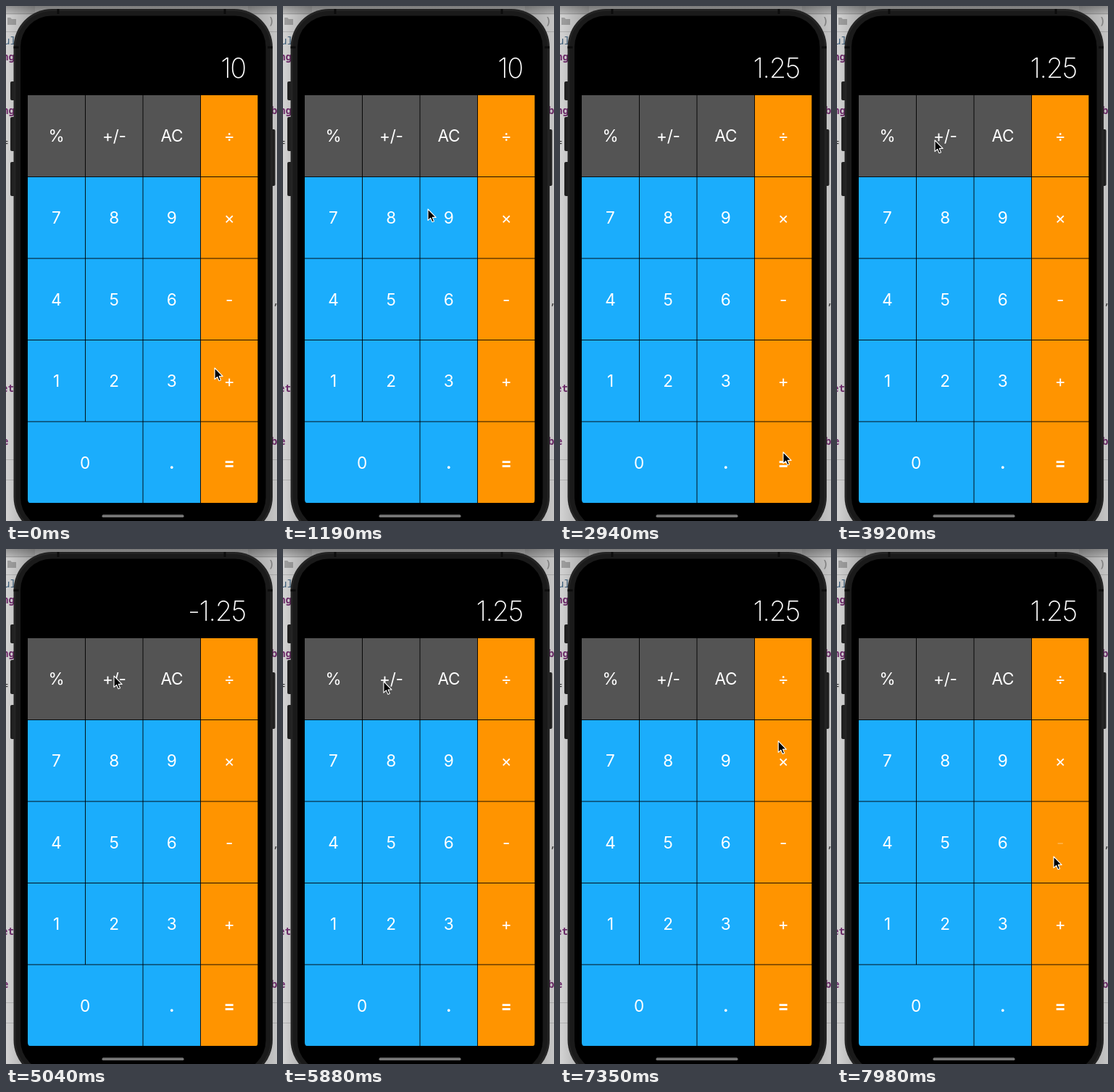
These frames come from a looping animation (374 px wide and 710 px high, 8 s). An HTML page:

```html
<!DOCTYPE html>
<html lang="en">
<head>
<meta charset="utf-8">
<title>Calculator</title>
<style>
  html, body { margin: 0; width: 100%; height: 100%; overflow: hidden; background: #d2d2d2; }
  svg { display: block; width: 100vw; height: 100vh; }
  text { font-family: Inter, "Open Sans", sans-serif; fill: #fff; }
  .key { font-size: 22.6px; text-anchor: middle; }
  .key.wide { letter-spacing: -.4px; }
  .key.bold { font-weight: 700; }
  #display { font-size: 38px; font-weight: 200; text-anchor: end; letter-spacing: -1.4px; }
  .code text { font: 600 14px "Noto Sans Mono", "DejaVu Sans Mono", monospace; fill: #762f72; }
  .code .dim { fill: #999; }
  .code .blue { fill: #426684; font-weight: 400; }
  .code .dark { fill: #333; font-weight: 400; }
</style>
</head>
<body>
<svg viewBox="0 0 374 710">
  <defs>
    <linearGradient id="sideL">
      <stop offset="0" stop-opacity=".06"/><stop offset="1" stop-opacity=".28"/>
    </linearGradient>
    <linearGradient id="sideR">
      <stop offset="0" stop-opacity=".28"/><stop offset="1" stop-opacity=".12"/>
    </linearGradient>
    <linearGradient id="topShade" x2="0" y2="1">
      <stop offset="0" stop-opacity=".3"/><stop offset="1" stop-opacity=".08"/>
    </linearGradient>
  </defs>

  <g class="code">
    <rect width="374" height="710" fill="#e0e0e0"/>
    <path d="M0 10.5H374M0 35.5H374M0 625.5H374M0 653.5H374" stroke="#bfbfbf"/>
    <path d="M2 16h4l2 2h6v8H2z" fill="#aaa"/>
    <text class="blue" x="-3" y="53">ul</text>
    <text x="-5" y="75">ng</text>
    <text x="-5" y="149">ng</text>
    <text class="dark" x="-5" y="193">=</text>
    <text x="-6" y="532">et</text>
    <text x="-5" y="605">e</text>
    <text class="dim" x="362" y="25">)</text>
    <text x="366" y="149">b</text>
    <text class="dark" x="368" y="412">,</text>
    <text x="366" y="605">b</text>
  </g>
  <rect width="40" height="710" fill="url(#sideL)"/>
  <rect x="334" width="40" height="710" fill="url(#sideR)"/>
  <rect x="40" width="294" height="12" fill="#000" opacity=".22"/>
  <rect width="374" height="12" fill="url(#topShade)"/>

  <g fill="#202020">
    <rect x="6" y="104" width="8" height="26" rx="2"/>
    <rect x="6" y="153" width="8" height="47" rx="2"/>
    <rect x="6" y="215" width="8" height="47" rx="2"/>
    <rect x="364" y="170" width="7.5" height="78" rx="2"/>
  </g>
  <rect x="10.5" y="4" width="357.5" height="726" rx="53" fill="#242424"/>
  <rect x="13.5" y="7" width="351.5" height="720" rx="50" fill="#1a1a1a"/>
  <path d="M72 4v7M302 4v7M10.5 57h7M361 57h7" stroke="#0c0c0c" stroke-width="3"/>
  <rect x="20" y="13.5" width="338.5" height="707" rx="43" fill="#000"/>

  <clipPath id="screen"><path d="M30 123H347.6V680Q347.6 685 345 685H33Q30 685 30 680Z"/></clipPath>
  <g id="keys" clip-path="url(#screen)"></g>
  <rect x="132.5" y="701.3" width="113" height="3.8" rx="1.9" fill="#767676"/>
  <text id="display" x="330.8" y="98.6">10</text>
  <path id="cursor" d="M0 0V15.6L3.6 12.3 6 17.8 8.5 16.7 6.2 11.4H11.1Z"
        fill="#000" stroke="#fff" stroke-width="1.1" stroke-linejoin="round"/>
</svg>

<script>
const LOOP = 8000, STEP = 70;
const COLS = [29.5, 109.5, 189, 268.5, 348];
const ROWS = [122.5, 235.5, 348, 460.5, 573, 685.5];
const GRAY = '#545454', BLUE = '#1badfc', ORANGE = '#ff9400';
const GAP = .9;
const LAYOUT = [
  ['%', '+/-', 'AC', '÷'],
  ['7', '8', '9', '×'],
  ['4', '5', '6', '-'],
  ['1', '2', '3', '+'],
  ['0', '', '.', '=']
];

// time, x, y of the pointer tip
const PATH = [
  [0, 288, 499], [490, 304, 185], [840, 304, 185], [1190, 200, 280],
  [1470, 150, 296], [1750, 150, 296], [2520, 308, 615], [3080, 308, 615],
  [3920, 135, 185], [4340, 141, 182], [5040, 149, 175], [5460, 149, 175],
  [6020, 137, 184], [6090, 137, 184], [6720, 305, 243], [7070, 302, 209],
  [7140, 302, 209], [7770, 299, 424], [8000, 299, 424]
];
// key, time down, time up
const PRESSES = [
  ['÷', 560, 700], ['8', 1470, 1610], ['=', 2590, 2730],
  ['+/-', 4690, 4830], ['+/-', 5530, 5670], ['-', 7910, 8100]
];
const PRESSED = .25;
const READOUT = [[0, '10'], [1610, '8'], [2730, '1.25'], [4830, '-1.25'], [5670, '1.25']];

const byId = id => document.getElementById(id);
const labels = {};

function add(tag, attrs, parent) {
  const el = document.createElementNS('http://www.w3.org/2000/svg', tag);
  for (const k in attrs) el.setAttribute(k, attrs[k]);
  return parent.appendChild(el);
}

LAYOUT.forEach((row, r) => row.forEach((label, c) => {
  if (!label) return;
  const x = COLS[c], right = COLS[label === '0' ? c + 2 : c + 1];
  const y = ROWS[r], bottom = ROWS[r + 1];
  add('rect', {
    x: x + GAP / 2, y: y + GAP / 2, width: right - x - GAP, height: bottom - y - GAP,
    fill: c === 3 ? ORANGE : r === 0 ? GRAY : BLUE
  }, byId('keys'));
  const style = '=.'.includes(label) ? ' bold' : label.length > 1 ? ' wide' : '';
  const text = add('text', {
    class: 'key' + style, x: (x + right) / 2, y: (y + bottom) / 2 + 8.4
  }, byId('keys'));
  text.textContent = label;
  labels[label] = text;
}));

const slope = (i, k) => (PATH[i + 1][k] - PATH[i][k]) / (PATH[i + 1][0] - PATH[i][0]);

function tangent(i, k) {
  if (i === 0) return slope(0, k);
  if (i === PATH.length - 1) return 0;
  const a = slope(i - 1, k), b = slope(i, k);
  return a * b > 0 ? 2 * a * b / (a + b) : 0;
}

// smooth curve through the points, without overshoot
function pointer(t, k) {
  let i = 0;
  while (i < PATH.length - 2 && t >= PATH[i + 1][0]) i++;
  const p = PATH[i], q = PATH[i + 1], d = q[0] - p[0], u = (t - p[0]) / d;
  const s = u * u * (3 - 2 * u);
  return p[k] + (q[k] - p[k]) * s
    + d * u * (1 - u) * ((1 - u) * tangent(i, k) - u * tangent(i + 1, k));
}

function opacity(key, t) {
  let o = 1;
  for (const [name, down, up] of PRESSES) {
    if (name === key && t >= down) o = t < up ? PRESSED : Math.min(1, PRESSED + (t - up) / 260);
  }
  return o;
}

function draw(now) {
  const t = Math.floor((now % LOOP) / STEP) * STEP;
  byId('cursor').setAttribute('transform', `translate(${pointer(t, 1)} ${pointer(t, 2)})`);
  byId('display').textContent = READOUT.filter(e => e[0] <= t).pop()[1];
  for (const key in labels) labels[key].setAttribute('opacity', opacity(key, t));
}

let start;
function tick(now) {
  start ??= now;
  draw(now - start);
  requestAnimationFrame(tick);
}
draw(0);
requestAnimationFrame(tick);
</script>
</body>
</html>
```
